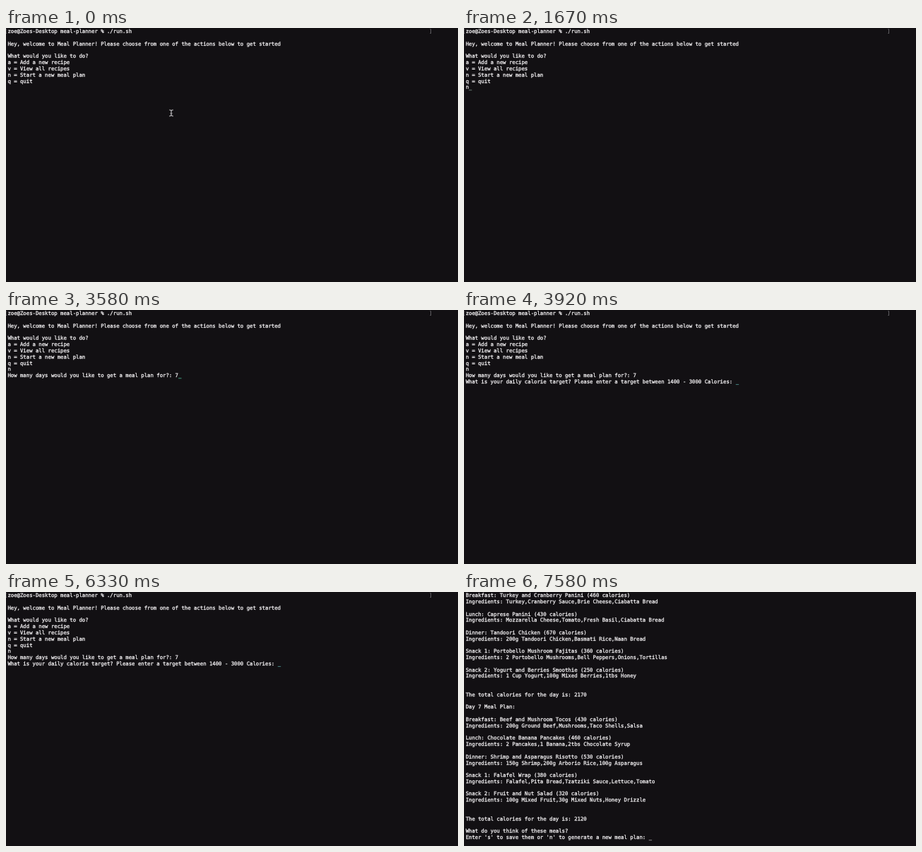
An HTML page that plays this animation: 640x360 px, repeating every 8000 ms.

```html
<!DOCTYPE html>
<html lang="en">
<head>
<meta charset="utf-8">
<title>Meal Planner</title>
<style>
  html, body { margin: 0; width: 100%; height: 100%; overflow: hidden; background: #121013; }
  svg { display: block; width: 640px; height: 360px; }
  text {
    font: 7.3px "DejaVu Sans Mono", "Liberation Mono", monospace;
    fill: #efedef;
    stroke: #efedef;
    stroke-width: .3;
    white-space: pre;
    text-rendering: geometricPrecision;
  }
  .mark { fill: #88868a; stroke: none; }
  #pointer { fill: none; stroke: #a9a7aa; stroke-width: 1.3; }
</style>
</head>
<body>
<svg viewBox="0 0 640 360">
  <rect width="640" height="360" fill="#121013"/>
  <g id="lines"></g>
  <g id="marks">
    <text class="mark" x="-1.9" y="7.2">[</text>
    <text class="mark" x="598.9" y="7.2">]</text>
  </g>
  <path id="pointer" d="M231.2 116.2Q234 116.2 234 118Q234 116.2 236.8 116.2M234 117.6V123.6M231.2 124.8Q234 124.8 234 123Q234 124.8 236.8 124.8M232.6 121.2H235.4"/>
  <rect id="cursor" width="4.4" height="1"/>
</svg>
<script>
const LOOP = 8000, LEFT = 2.4, CHAR = 4.395, ROW = 8.79, BASE = 7.2;
const $ = id => document.getElementById(id);

const menu = `zoe@Zoes-Desktop meal-planner % ./run.sh

Hey, welcome to Meal Planner! Please choose from one of the actions below to get started

What would you like to do?
a = Add a new recipe
v = View all recipes
n = Start a new meal plan
q = quit
`;

const plan = `Breakfast: Turkey and Cranberry Panini (460 calories)
Ingredients: Turkey,Cranberry Sauce,Brie Cheese,Ciabatta Bread

Lunch: Caprese Panini (430 calories)
Ingredients: Mozzarella Cheese,Tomato,Fresh Basil,Ciabatta Bread

Dinner: Tandoori Chicken (670 calories)
Ingredients: 200g Tandoori Chicken,Basmati Rice,Naan Bread

Snack 1: Portobello Mushroom Fajitas (360 calories)
Ingredients: 2 Portobello Mushrooms,Bell Peppers,Onions,Tortillas

Snack 2: Yogurt and Berries Smoothie (250 calories)
Ingredients: 1 Cup Yogurt,100g Mixed Berries,1tbs Honey


The total calories for the day is: 2170

Day 7 Meal Plan:

Breakfast: Beef and Mushroom Tocos (430 calories)
Ingredients: 200g Ground Beef,Mushrooms,Taco Shells,Salsa

Lunch: Chocolate Banana Pancakes (460 calories)
Ingredients: 2 Pancakes,1 Banana,2tbs Chocolate Syrup

Dinner: Shrimp and Asparagus Risotto (530 calories)
Ingredients: 150g Shrimp,200g Arborio Rice,100g Asparagus

Snack 1: Falafel Wrap (380 calories)
Ingredients: Falafel,Pita Bread,Tzatziki Sauce,Lettuce,Tomato

Snack 2: Fruit and Nut Salad (320 calories)
Ingredients: 100g Mixed Fruit,30g Mixed Nuts,Honey Drizzle


The total calories for the day is: 2120

What do you think of these meals?
Enter 's' to save them or 'n' to generate a new meal plan: `;

const days = menu + "n\nHow many days would you like to get a meal plan for?: ";
const target = days + "7\nWhat is your daily calorie target? Please enter a target between 1400 - 3000 Calories: ";

const GREEN = "#3f9c7c", DIM = "#64786f", TEAL = "#44807f", GREY = "#858386";

// Each step: start time, screen text, cursor colour (none = blinked off)
const steps = [
  [0, menu], [330, menu, GREEN], [670, menu], [1000, menu, GREEN], [1330, menu],
  [1670, menu + "n", DIM],
  [2170, days, GREEN], [2670, days], [3000, days, GREEN], [3330, days],
  [3580, days + "7", GREEN],
  [3920, target, TEAL], [4670, target], [5000, target, TEAL], [5330, target],
  [5670, target, TEAL], [6000, target], [6330, target, TEAL],
  [6500, target + "2", TEAL], [6580, target + "21", TEAL],
  [7000, target + "210", TEAL], [7080, target + "2100", TEAL],
  [7500, target + "2100\n", GREEN],
  [7580, plan, GREY]
];

function addLine(str, row) {
  const el = document.createElementNS("http://www.w3.org/2000/svg", "text");
  el.setAttribute("x", LEFT);
  el.setAttribute("y", row * ROW + BASE);
  el.textContent = str;
  $("lines").append(el);
}

function show([time, text, color]) {
  const rows = text.split("\n"), last = rows.length - 1;
  $("lines").replaceChildren();
  rows.forEach((str, row) => str && addLine(str, row));

  const cursor = $("cursor");
  cursor.setAttribute("x", LEFT + rows[last].length * CHAR);
  cursor.setAttribute("y", last * ROW + 8.4);
  cursor.setAttribute("fill", color || "none");

  $("marks").style.display = text === plan ? "none" : "";
  $("pointer").style.display = text === menu ? "" : "none";
}

let current;
function tick() {
  const t = performance.now() % LOOP;
  const step = steps.findLast(s => s[0] <= t);
  if (step !== current) show(current = step);
  requestAnimationFrame(tick);
}
tick();
</script>
</body>
</html>
```
